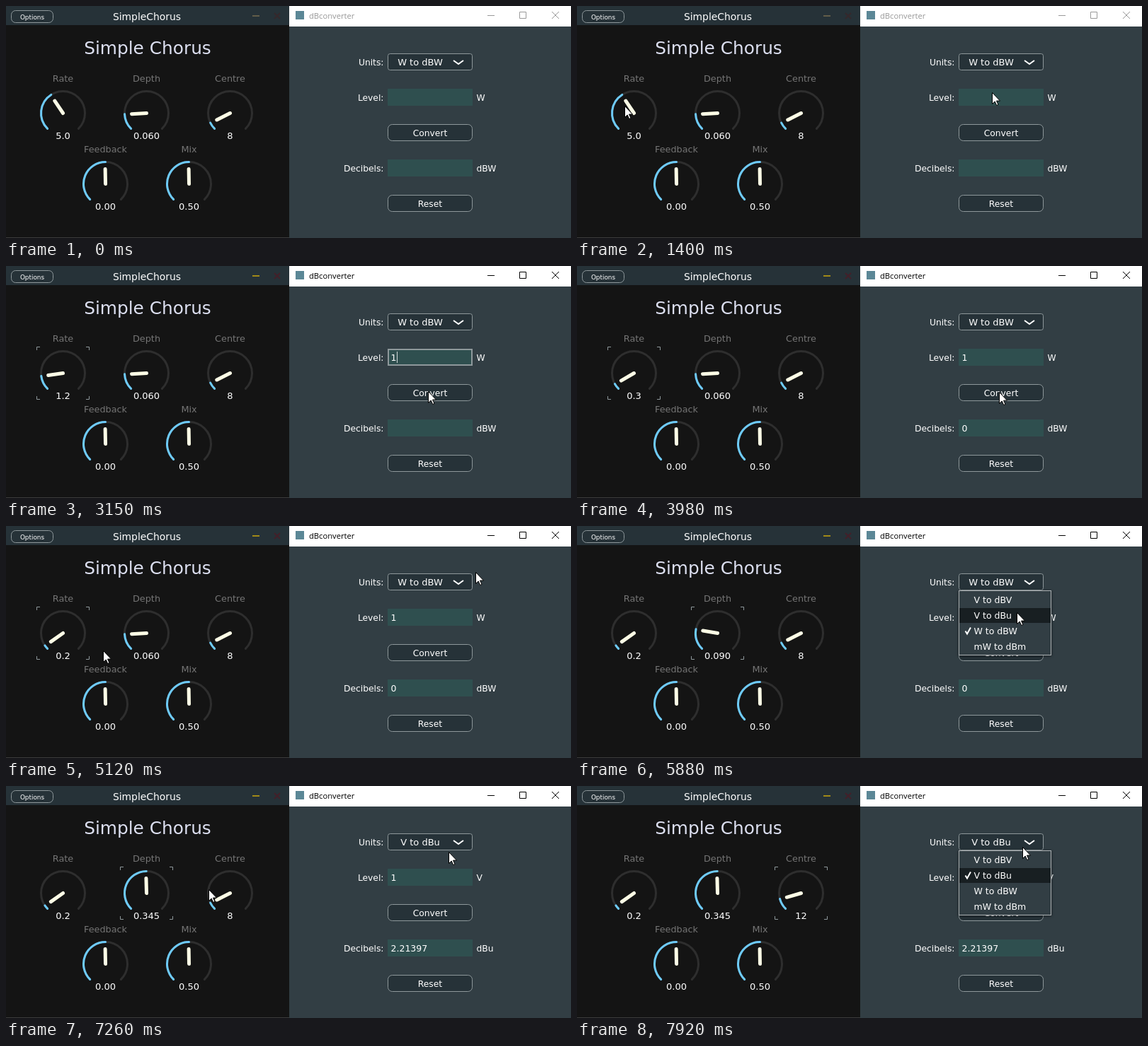
An HTML page that plays this animation: 798 px wide and 328 px high, repeating every 7990 ms.

```html
<!DOCTYPE html>
<html lang="en">
<head>
<meta charset="utf-8">
<title>Plugin and converter</title>
<style>
  html, body { margin: 0; width: 100%; height: 100%; overflow: hidden; background: #141414; }
  svg { display: block; width: 798px; height: 328px; }
  text { font: 12.3px "DejaVu Sans", sans-serif; fill: #fff; white-space: pre; }
  .mid { text-anchor: middle; }
  .end { text-anchor: end; }
  .heading { font-size: 24.8px; fill: #dcdff0; }
  .bar { font-size: 13.9px; }
  .small { font-size: 8.9px; }
  .name { font-size: 12.8px; fill: #757575; }
  .value, .combo { font-size: 13px; }
  .field, .item { font-size: 12.5px; }
  .box { fill: #263238; stroke: #8e989b; }
  .slot { fill: #2f4f4f; }
  .line { fill: none; stroke: #8e989b; }
  .track, .fill, .hand { fill: none; stroke-width: 3; stroke-linecap: round; }
  .track { stroke: #2e2e2e; }
  .fill { stroke: #6ecbfa; }
  .hand { stroke: #fdfde6; stroke-width: 5; }
  .chevron, .tick { fill: none; stroke: #fff; stroke-width: 2; }
  .arrow { fill: #fff; stroke: #000; stroke-linejoin: round; }
  .min { stroke: #625d49; stroke-width: 2; }
  .close { fill: none; stroke: #35282c; stroke-width: 2; }
  .active .min { stroke: #a18917; }
  .active .close { stroke: #43202a; }
  .frame text { font: 11.2px "Open Sans", sans-serif; fill: #999; }
  .frame path { fill: none; stroke: #999; }
  .frame.active text { fill: #000; }
  .frame.active path { stroke: #000; }
  #popup { filter: drop-shadow(0 1px 2px rgba(0, 0, 0, .45)); }
</style>
</head>
<body>
<svg viewBox="0 0 798 328">
  <defs>
    <path id="arrow" class="arrow" d="M.5.5v16l3.700-3.500 2.500 5.500 2.300-1-2.500-5.400h5z"/>
    <rect id="button" class="box" x="539.5" width="119" height="23" rx="6"/>
    <rect id="slot" class="slot" x="539" width="120" height="24"/>
  </defs>

  <g id="plugin">
    <rect width="400" height="328" fill="#141414"/>
    <rect y="327" width="400" height="1" fill="#3c3c3c"/>
    <rect width="400" height="27" fill="#263238"/>
    <rect class="box" x="7.5" y="6.5" width="59" height="17" rx="6"/>
    <text class="small mid" x="37" y="19">Options</text>
    <text class="bar mid" x="199" y="20">SimpleChorus</text>
    <path class="min" d="M348 14h10"/>
    <path class="close" d="M379 10l8 8m0-8l-8 8"/>
    <text class="heading mid" x="200" y="68">Simple Chorus</text>
    <g id="knobs"></g>
    <path id="corners" class="line"
      d="M-37 -32.500V-37h4.500M32.500 -37H37v4.500M37 32.500V37h-4.500M-32.500 37H-37v-4.500"/>
  </g>

  <rect x="400" width="398" height="328" fill="#323e44"/>
  <rect x="400" width="398" height="29" fill="#fff"/>
  <g id="frame" class="frame">
    <rect x="409" y="7" width="12" height="12" fill="#5b8796"/>
    <text x="428" y="18">dBconverter</text>
    <path d="M680 13.500h10M725.500 8.500h9v9h-9zM771 8l10 10m0-10l-10 10"/>
  </g>

  <text class="end" x="533.5" y="84">Units:</text>
  <rect class="box" x="539.5" y="67.5" width="119" height="23" rx="3"/>
  <text id="combo" class="combo mid" x="585" y="84"></text>
  <path class="chevron" d="M632 77l7 5 7-5"/>

  <text class="end" x="533.5" y="134">Level:</text>
  <use href="#slot" y="117"/>
  <text id="level" class="field" x="543.5" y="134"></text>
  <g id="focus">
    <rect class="line" x="540" y="118" width="118" height="22" stroke-width="2"/>
    <rect id="caret" y="121" width="1" height="16" fill="#cfd8d8"/>
  </g>
  <text id="unitIn" x="664.5" y="134"></text>

  <use href="#button" y="167.5"/>
  <text class="mid" x="599" y="184">Convert</text>

  <text class="end" x="533.5" y="234">Decibels:</text>
  <use href="#slot" y="217"/>
  <text id="result" class="field" x="543.5" y="234"></text>
  <text id="unitOut" x="664.5" y="234"></text>

  <use href="#button" y="267.5"/>
  <text class="mid" x="599" y="284">Reset</text>

  <g id="popup">
    <rect x="539.5" y="91.5" width="130" height="91" fill="#323e44" stroke="#adb2b4"/>
    <rect id="hover" x="540" width="129" height="21" fill="#181f22"/>
    <g id="items"></g>
    <path id="tick" class="tick" d="M548.500 0l2.500 4 5-9"/>
  </g>

  <use id="mouseL" href="#arrow"/>
  <use id="mouseR" href="#arrow"/>
</svg>

<script>
const LOOP = 7990, STEP = 70, ROW = 22, MENU = 93;
const $ = id => document.getElementById(id);
const show = (el, on) => el.style.display = on ? '' : 'none';
const put = (el, text) => { if (el.textContent !== text) el.textContent = text; };
const move = (el, x, y) => el.setAttribute('transform', `translate(${x} ${y})`);

// Follows moves { from, till, to }, advancing once per screen update
function follow(start, moves, t) {
  let pos = start;
  for (const { from, till, to } of moves) {
    if (t < from) break;
    const u = t >= till ? 1 : Math.floor((t - from) / STEP) * STEP / (till - from);
    pos = pos.map((v, i) => v + (to[i] - v) * u);
  }
  return pos;
}
const go = (from, till, ...to) => ({ from, till, to });

const sliders = [
  { name: 'Rate', digits: 1, max: 20, skew: .7, value: 5, grab: 1880, release: 4640,
    moves: [go(2210, 2620, 1.2), go(3150, 4050, .2)] },
  { name: 'Depth', digits: 3, max: 1, skew: .655, value: .06, grab: 5740, release: 6500,
    moves: [go(5740, 5880, .09), go(5880, 6090, .345)] },
  { name: 'Centre', digits: 0, min: 1, max: 100, value: 8, grab: 7790, release: LOOP,
    moves: [go(7790, 7920, 12)] },
  { name: 'Feedback', digits: 2, min: -1, max: 1, value: 0 },
  { name: 'Mix', digits: 2, max: 1, value: .5 }
];
const grabbed = sliders.filter(s => s.grab);

const handL = [
  go(1130, 1400, 67, 141), go(1880, 4640, 73, 189), go(4910, 5120, 137, 176),
  go(5190, 5470, 192, 152), go(5740, 6500, 193, 121), go(6700, 6770, 243, 137),
  go(6840, 7460, 306, 150)
];
const handR = [
  go(1130, 1400, 586, 122), go(2210, 2620, 596, 177), go(3910, 4640, 598, 191),
  go(4910, 5120, 663, 65), go(5190, 5400, 634, 79), go(5740, 5880, 621, 122),
  go(6700, 6770, 604, 127), go(7000, 7300, 634, 79), go(7790, 7920, 629, 86)
];

function arc(p) {
  const r = 31, a = (p * 270 - 135) * Math.PI / 180, s = r * Math.SQRT1_2;
  return `M${-s} ${s}A${r} ${r} 0 ${p > 2 / 3 ? 1 : 0} 1 ${r * Math.sin(a)} ${-r * Math.cos(a)}`;
}

// Three knobs above, two centred below
sliders.forEach((s, i) => {
  const low = i > 2 ? 1 : 0;
  s.x = 80.5 + 118 * (i - 3 * low) + 60 * low;
  s.y = 151.5 + 100 * low;
  $('knobs').insertAdjacentHTML('beforeend',
    `<g transform="translate(${s.x} ${s.y})">
      <text class="name mid" y="-44.5">${s.name}</text>
      <path class="track" d="${arc(1)}"/><path class="fill"/>
      <path class="hand" d="M0 0V-21"/>
      <text class="value mid" y="36.5"></text>
    </g>`);
  const g = $('knobs').lastElementChild;
  const [fill, hand, value] = ['.fill', '.hand', '.value'].map(c => g.querySelector(c));
  const { min = 0, max, skew = 1, moves = [] } = s;
  s.draw = t => {
    const [v] = follow([s.value], moves, t);
    const p = ((v - min) / (max - min)) ** skew;
    fill.setAttribute('d', arc(p));
    hand.setAttribute('transform', `rotate(${p * 270 - 136})`);
    put(value, v.toFixed(s.digits));
  };
});

const units = [['V', 'dBV'], ['V', 'dBu'], ['W', 'dBW'], ['mW', 'dBm']];
const label = u => u.join(' to ');
$('items').innerHTML = units.map((u, i) =>
  `<text class="item" x="560.5" y="${MENU + 16 + ROW * i}">${label(u)}</text>`).join('');

function draw(t) {
  const within = (a, b) => t >= a && t < b;

  sliders.forEach(s => s.draw(t));
  const held = grabbed.filter(s => t >= s.grab).pop();
  $('plugin').classList.toggle('active', !!held);
  show($('corners'), held);
  if (held) move($('corners'), held.x, held.y);

  const typed = t >= 2340, converted = t >= 3290, pick = t >= 6020 ? 1 : 2;
  $('frame').classList.toggle('active', t >= 1610);
  show($('focus'), t >= 1880 && !converted);
  $('caret').setAttribute('x', typed ? 552 : 544);
  put($('level'), typed ? '1' : '');
  put($('result'), !converted ? '' : pick === 2 ? '0' : '2.21397');
  put($('combo'), label(units[pick]));
  put($('unitIn'), units[pick][0]);
  put($('unitOut'), units[pick][1]);

  const [x, y] = follow([693, 275], handR, t);
  const over = Math.floor((y - MENU) / ROW);
  show($('popup'), within(5470, 6020) || within(7380, LOOP));
  $('hover').setAttribute('y', MENU + 1 + ROW * (units[over] ? over : pick));
  move($('tick'), 0, MENU + 11.5 + ROW * pick);

  move($('mouseR'), Math.round(x), Math.round(y));
  show($('mouseR'), t >= 870);
  move($('mouseL'), ...follow([94, 309], handL, t).map(Math.round));
  show($('mouseL'), t >= 870 && !grabbed.some(s => within(s.grab, s.release)));
}

function loop() {
  draw(performance.now() % LOOP);
  requestAnimationFrame(loop);
}
loop();
</script>
</body>
</html>
```
